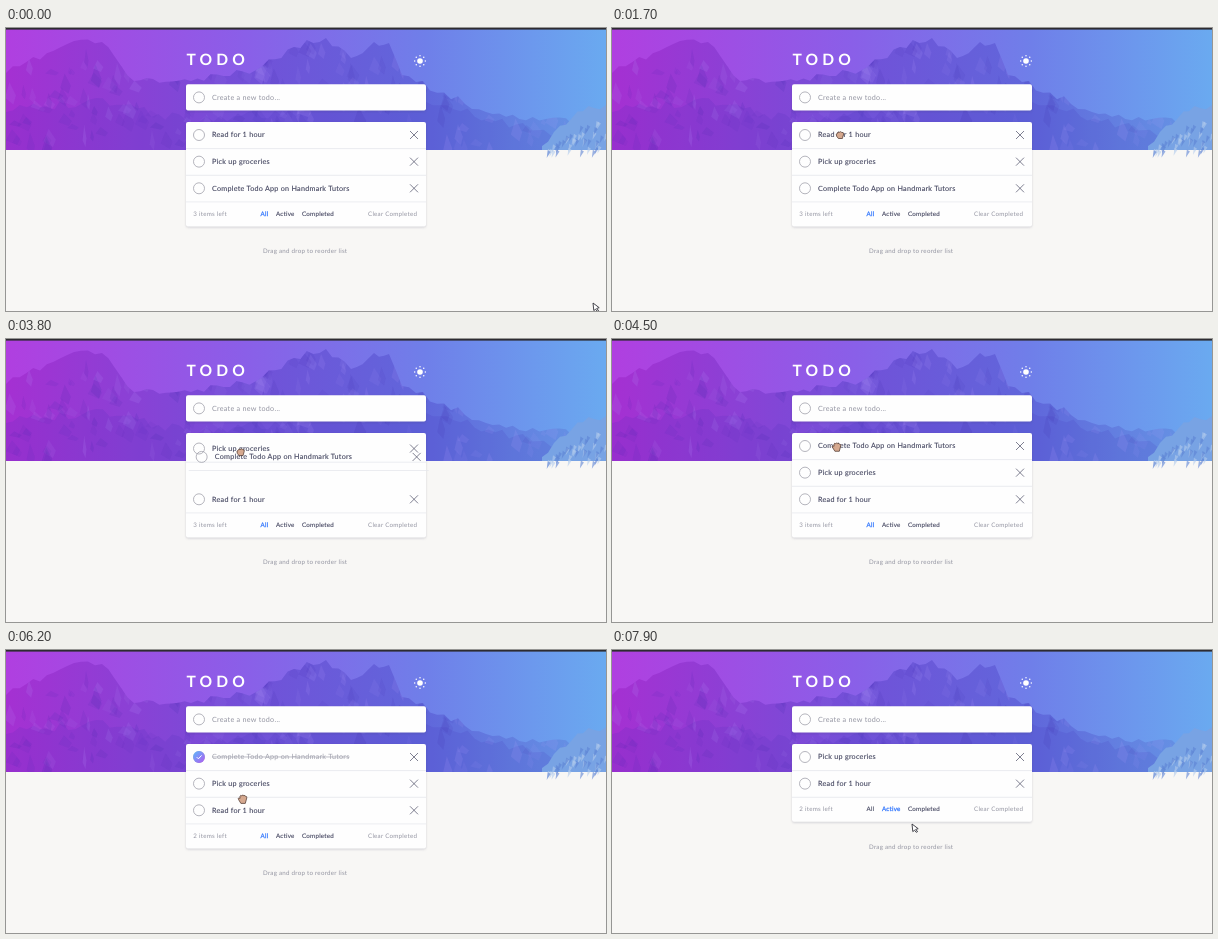
An HTML page that plays this animation: 600 by 283 pixels, repeating every 8000 ms.

```html
<!DOCTYPE html>
<html lang="en">
<head>
<meta charset="utf-8">
<title>Todo</title>
<style>
  html, body { margin: 0; width: 100%; height: 100%; overflow: hidden; background: #f8f7f5; }
  svg { display: block; width: 100%; height: 100%; }
  text { font: 7.2px Lato, "Open Sans", sans-serif; letter-spacing: .26px; fill: #43455f; stroke: #43455f; stroke-width: .12; text-rendering: geometricPrecision; }
  .title { font-size: 15.6px; font-weight: 700; letter-spacing: 4.1px; fill: #fff; stroke: none; }
  .small { font-size: 6.2px; letter-spacing: .25px; }
  .muted { fill: #9394a1; stroke: none; }
  .on { fill: #3a7cfd; stroke: #3a7cfd; stroke-width: .3; }
  .card { fill: #fefefe; filter: drop-shadow(0 1px 1px rgba(60, 60, 90, .2)); }
  .ring { fill: none; stroke: #a3a3ad; stroke-width: .8; }
  .cross { fill: none; stroke: #55566c; stroke-width: .75; }
  .line { stroke: #e6e7ec; stroke-width: .8; }
  .done text { fill: #a2a3ae; stroke: none; text-decoration: line-through; }
  .check { visibility: hidden; }
  .done .check { visibility: visible; }
  .hand { fill: #d6a98f; stroke: #513a32; stroke-width: .75; stroke-linejoin: round; }
  .arrow { fill: #fff; stroke: #33333a; stroke-width: .9; stroke-linejoin: round; }
</style>
</head>
<body>
<svg viewBox="0 0 600 283" preserveAspectRatio="none">
  <defs>
    <linearGradient id="sky">
      <stop offset="0" stop-color="#b03fe0"/><stop offset=".4" stop-color="#8a5fe8"/>
      <stop offset=".7" stop-color="#6f7fe9"/><stop offset="1" stop-color="#6aaaf0"/>
    </linearGradient>
    <linearGradient id="rock" gradientUnits="userSpaceOnUse" x2="600">
      <stop offset="0" stop-color="#a530d2"/><stop offset=".4" stop-color="#7250d8"/>
      <stop offset=".7" stop-color="#6067db"/><stop offset="1" stop-color="#669ae6"/>
    </linearGradient>
    <linearGradient id="tick" x2="1" y2="1">
      <stop offset="0" stop-color="#59b9fb"/><stop offset="1" stop-color="#b45af0"/>
    </linearGradient>
    <clipPath id="range"></clipPath>
  </defs>
  <rect width="600" height="283" fill="#f8f7f5"/>
  <rect y="1" width="600" height="121" fill="url(#sky)"/>
  <g id="rocks" clip-path="url(#range)">
    <rect width="600" height="122" fill="url(#rock)"/>
  </g>
  <g id="crag"></g>
  <rect width="600" height="1.6" fill="#2d2b31"/>

  <text class="title" x="180.5" y="36.6">TODO</text>
  <circle cx="414" cy="33" r="2.8" fill="#fff"/>
  <g id="rays" fill="#fff"></g>

  <rect class="card" x="180" y="56.3" width="240" height="26.2" rx="2"/>
  <circle class="ring" cx="193" cy="69.4" r="5.5"/>
  <text class="muted" x="206" y="71.7">Create a new todo...</text>

  <rect class="card" id="list" x="180" y="94" width="240" rx="2"/>
  <g id="rows"></g>
  <g id="footer">
    <text class="small muted" id="count" x="187.3" y="188"></text>
    <text class="small" id="all" x="254.5" y="188">All</text>
    <text class="small" id="active" x="270" y="188">Active</text>
    <text class="small" x="296" y="188">Completed</text>
    <text class="small muted" x="362" y="188">Clear Completed</text>
    <text class="small muted" x="257" y="225.3">Drag and drop to reorder list</text>
  </g>

  <g id="cursor">
    <path id="arrow" class="arrow" d="M-3 -4L3.2 .7L.7 1.4L2.6 3.6L1.2 4.3L-.4 2.2L-2.2 3.6Z"/>
    <path id="grab" class="hand" d="M-3.8 .8C-5 -.8 -3.6 -1.6 -2.5 -.5V-2.8Q-1.6 -4.6 -.8 -3Q.4 -5.2 1.2 -3.2Q2.8 -4.2 3 -2.6Q4.6 -2.8 4.3 -1.2L2.8 4.4H-1.6Z"/>
    <path id="fist" class="hand" d="M-3.4 1.2Q-4.4 -1.6 -2.7 -1.5Q-2.2 -3.6 -.6 -2.7Q.6 -4 1.7 -2.6Q3.8 -3 3.6 -.9L2.4 3.5H-1.6Z"/>
    <path id="point" class="hand" d="M-3.9 -3.4Q-3 -5 -2 -3.4L-1 -1.3Q.4 -2.2 1.1 -1.1Q2.4 -1.6 3 -.4Q4.4 -.2 4.3 1.6L3.8 4.6H-1.2L-4 1.7Q-4.2 .2 -2.6 1Z"/>
  </g>
</svg>
<script>
const LOOP = 8000, STEP = 100, TOP = 94, ROW = 26.65, SLIDE = 200;
const CHECKED = 5600, FILTERED = 7500;
const $ = id => document.getElementById(id);

function add(parent, tag, attrs, text = "") {
  const el = document.createElementNS("http://www.w3.org/2000/svg", tag);
  for (const name in attrs) el.setAttribute(name, attrs[name]);
  el.textContent = text;
  parent.append(el);
  return el;
}

let seed = 11;
const random = () => (seed = seed * 16807 % 2147483647) / 2147483647;

// Joins the peaks with a jagged line and closes the shape at the banner's foot
function ridge(peaks, rough) {
  const points = peaks.slice(1).flatMap(([x1, y1], i) => {
    const [x0, y0] = peaks[i];
    const count = Math.ceil((x1 - x0) / 7);
    return Array.from({ length: count }, (_, n) =>
      [x0 + (x1 - x0) * n / count, y0 + (y1 - y0) * n / count + (n && (random() - .5) * rough)]);
  });
  return `M${peaks[0][0]} 122L${[...points, peaks.at(-1)].join("L")}V122Z`;
}

function drawMountains() {
  add($("range"), "path", { d: ridge([[0, 45], [68, 13], [96, 14], [128, 53], [185, 53],
    [250, 42], [288, 19], [320, 10], [345, 30], [368, 14], [383, 15], [396, 47], [480, 84], [600, 98]], 7) });
  add($("rocks"), "path", { d: ridge([[0, 84], [90, 70], [180, 92], [420, 74], [600, 122]], 12),
    fill: "#3f2cae", opacity: .13 });
  for (let i = 0; i < 260; i++) {
    const x = random() * 600, y = 10 + random() * 105;
    const w = 2 + random() * 7, h = 6 + random() * 18, lit = i % 2;
    add($("rocks"), "path", {
      d: `M${x} ${y}l${w} ${h * .6}l${-w * .4} ${h * .4}l${-w * 1.3} ${-h * .3}Z`,
      fill: lit ? "#b9a0fa" : "#3a25a4",
      opacity: .05 + random() * .09
    });
  }
  const slope = [[536, 118], [566, 90], [588, 80], [600, 77]];
  add($("crag"), "path", { d: ridge(slope, 9), fill: "#78a3e4" });
  for (let i = 0; i < 40; i++) {
    const x = 540 + random() * 60, y = 122 - random() * (x - 536) * .65;
    add($("crag"), "path", { d: `M${x} ${y}l3 2l-4 6Z`, fill: i % 2 ? "#b2cbec" : "#5b82d4", opacity: .6 });
  }
}

function drawRays() {
  for (let i = 0; i < 8; i++) {
    const a = i * Math.PI / 4;
    add($("rays"), "circle", { cx: 414 + 5.3 * Math.cos(a), cy: 33 + 5.3 * Math.sin(a), r: .75 });
  }
}

function makeRow(label) {
  const row = add($("rows"), "g", {});
  add(row, "circle", { class: "ring", cx: 193, cy: 107, r: 5.5 });
  add(row, "circle", { class: "check", cx: 193, cy: 107, r: 5.9, fill: "url(#tick)" });
  add(row, "path", { class: "check", d: "M190.7 107.1l1.7 1.7l3.2 -3.4", fill: "none", stroke: "#fff" });
  add(row, "text", { x: 206, y: 109.3 }, label);
  add(row, "path", { class: "cross", d: "M404 103l8 8m0 -8l-8 8" });
  add(row, "path", { class: "line", d: "M180 120.6h240" });
  return row;
}

const ease = k => .5 - .5 * Math.cos(Math.PI * Math.min(1, Math.max(0, k)));
const mix = (a, b, k) => a.map((v, i) => v + (b[i] - v) * k);

const home = [590, 279];
const trips = [
  { from: 100, to: 1000, end: [228, 107] },   // to the first task
  { from: 1700, to: 2300, end: [230, 140] },  // drag it down
  { from: 2300, to: 2600, end: [231, 182] },
  { from: 2700, to: 3000, end: [232, 155.5] },
  { from: 3100, to: 4000, end: [235, 107.5] },// drag the last task up
  { from: 4200, to: 5100, end: [193, 109] },  // to its checkbox
  { from: 5700, to: 6700, end: [280, 189] },  // to the "Active" filter
  { from: 7600, to: 7900, end: [303, 178] }
];
const cursorAt = t => trips.reduce((pos, { from, to, end }) => mix(pos, end, ease((t - from) / (to - from))), home);

// A move sends a task to a slot at a time; while held, it follows the cursor
const tasks = [
  { el: makeRow("Read for 1 hour"), slot: 0, held: [1500, 2300], moves: [[2300, 1], [3400, 2]] },
  { el: makeRow("Pick up groceries"), slot: 1, moves: [[1950, 0], [3760, 1]] },
  { el: makeRow("Complete Todo App on Handmark Tutors"), slot: 2, held: [3100, 4000], moves: [[4000, 0]] }
];
const last = tasks[2].el;
const isHeld = ({ held }, t) => held && t >= held[0] && t < held[1];

function offsetAt(task, t) {
  const start = [0, task.slot * ROW];
  if (isHeld(task, t)) {
    const grip = cursorAt(task.held[0]);
    return cursorAt(t).map((v, i) => start[i] + v - grip[i]);
  }
  const move = task.moves.findLast(([time]) => time <= t);
  if (!move) return start;
  const [time, slot] = move;
  return mix(offsetAt(task, time - 1), [0, slot * ROW], ease((t - time) / SLIDE));
}

function cursorKind([x, y], t, count) {
  const row = Math.floor((y - TOP) / ROW);
  if (tasks.some(task => isHeld(task, t))) return "fist";
  if (x < 180 || x > 420 || row < 0) return "arrow";
  if (row < count) return x < 200 ? "point" : "grab";
  const onFilter = x > 254 && x < 328 && Math.abs(y - TOP - count * ROW - 12) < 6;
  return onFilter ? "point" : "arrow";
}

const place = (el, [x, y]) => el.setAttribute("transform", `translate(${x} ${y})`);

function draw(t) {
  const done = t >= CHECKED, filtered = t >= FILTERED;
  const count = filtered ? 2 : 3, lift = filtered ? ROW : 0;
  for (const task of tasks) {
    const [x, y] = offsetAt(task, t);
    place(task.el, [x, y - lift]);
  }
  last.classList.toggle("done", done);
  last.style.display = filtered ? "none" : "";
  $("list").setAttribute("height", 24.5 + count * ROW);
  place($("footer"), [0, -lift]);
  $("count").textContent = `${done ? 2 : 3} items left`;
  $("all").classList.toggle("on", !filtered);
  $("active").classList.toggle("on", filtered);

  const pos = cursorAt(t), kind = cursorKind(pos, t, count);
  place($("cursor"), pos);
  for (const shape of $("cursor").children) shape.style.display = shape.id === kind ? "" : "none";
}

drawMountains();
drawRays();
const start = performance.now();
function tick() {
  const t = (performance.now() - start) % LOOP;
  draw(Math.floor(t / STEP) * STEP);
  requestAnimationFrame(tick);
}
tick();
</script>
</body>
</html>
```
